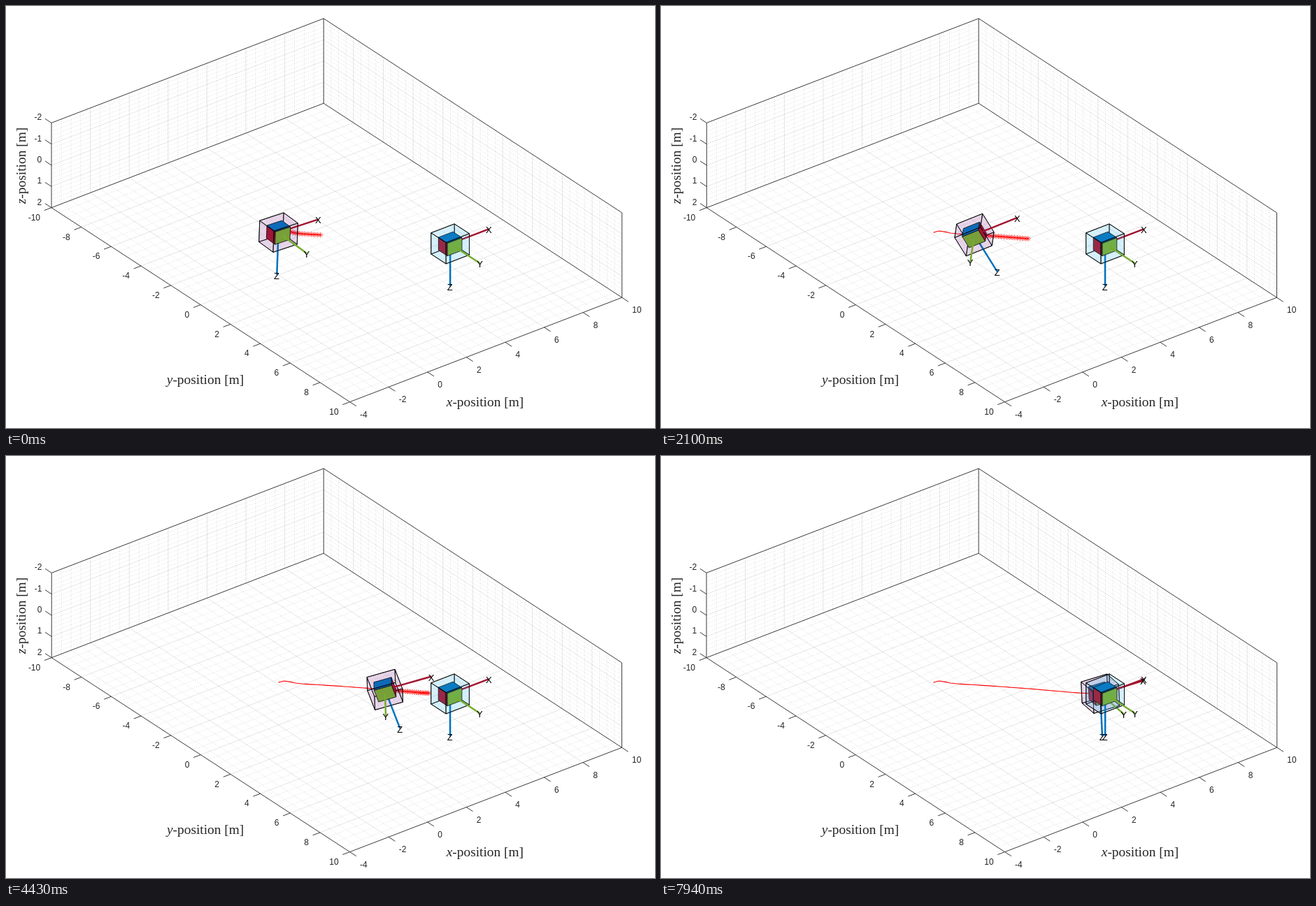
An HTML page for the animation above (8000 ms loop, 928x604 px).

```html
<!DOCTYPE html>
<html lang="en">
<head>
<meta charset="utf-8">
<title>Approach and docking</title>
<style>
html, body { margin: 0; width: 100%; height: 100%; overflow: hidden; background: #fff; }
svg { display: block; width: 928px; height: 604px; }
text { fill: #262626; font: 12px "Liberation Sans", Arial, sans-serif; }
.title { font: 19.4px "Liberation Serif", "Times New Roman", serif; text-anchor: middle; }
.title tspan { font-style: italic; }
.tag { fill: #000; font-size: 13px; text-anchor: middle; }
path, polygon { fill: none; stroke-linejoin: round; }
.major { stroke: #262626; stroke-opacity: .15; stroke-width: .8; }
.minor { stroke: #1a1a1a; stroke-opacity: .25; stroke-width: .6; stroke-dasharray: 1 2; }
.frame { stroke: #262626; stroke-width: .9; }
.edge { stroke: #000; stroke-width: .8; }
.trail { stroke: #f00; stroke-width: 1.1; }
.star { stroke: #f00; stroke-width: .7; }
</style>
</head>
<body>
<svg viewBox="0 0 928 604"><g id="scene"><g id="axes"></g><g id="bodies"></g></g></svg>
<script>
const LOOP = 8000, STEP = 100.6, UNIT = 35.04;
const COLORS = ['#a2142f', '#77ac30', '#0072bd'];
const INNER = [.375, .3, .3], OUTER = [.6, .5, .5];
const HOME = [55.6, 42.66, 0, -21.34, 27.8, 60.7];

// time, screen x, horizontal plot scale, then screen right and down parts of the body axes
const KEYS = [
  [0, 389.5, 1, 57.5, 40.8, -2.2, -18.5, 30.3, 61],
  [1210, 414, .9976, 67.5, 15.8, -.7, -9, 38.6, 57.6],
  [2100, 447.5, .9993, 61.9, -5.6, 32.9, -23.8, 39.2, 54.2],
  [3520, 505, 1, 63.9, -3.1, 28.4, -21.8, 39.7, 54.2],
  [5440, 580, .999, 67.4, 8.4, 12.9, -15.8, 35.7, 58.7],
  [6840, 615.3, 1, 64.1, 26.1, 4.1, -16.8, 29.5, 61.2],
  [7940, 628.2, 1, 61, 33.5, 2.7, -20, 28.3, 60.5],
  [10000, 634.5, 1, ...HOME]
];
const ROUTE = [[389, 324.3], [397, 322], [407, 323.3], [414, 325], [425, 326.2], [447, 327.5],
  [490, 330.3], [505, 331.5], [533, 333.6], [580, 337.7], [600, 339.3], [618, 340], [640, 340.5]];

const $ = id => document.getElementById(id);
const dot = (a, b) => a[0] * b[0] + a[1] * b[1] + a[2] * b[2];
const cross = (a, b) => [0, 1, 2].map(i => a[(i + 1) % 3] * b[(i + 2) % 3] - a[(i + 2) % 3] * b[(i + 1) % 3]);
const unit = a => a.map(v => v / Math.hypot(...a));
const fmt = p => p.map(v => v.toFixed(2)).join(' ');
const path = (points, cls, extra = '') => `<path class="${cls}" d="M${points.map(fmt).join('L')}" ${extra}/>`;
const world = (x, y, z) => [389.5 + 27.8 * x + 21.33 * y, 324.3 - 10.67 * x + 13.9 * y + 30.34 * z];

function segment(list, at) {
  let i = 0;
  while (i < list.length - 2 && at >= list[i + 1][0]) i++;
  return i;
}

function routeY(x) {
  const i = segment(ROUTE, x), [x0, y0] = ROUTE[i], [x1, y1] = ROUTE[i + 1];
  return y0 + (y1 - y0) * (x - x0) / (x1 - x0);
}

function slope(i, c) {
  if (i === 0 || i === KEYS.length - 1) return 0;
  const a = KEYS[i - 1], b = KEYS[i + 1];
  return (b[c] - a[c]) / (b[0] - a[0]);
}

// Cubic Hermite value of one column at time t
function track(t, c) {
  t = Math.min(t, KEYS[KEYS.length - 1][0]);
  const i = segment(KEYS, t), a = KEYS[i], b = KEYS[i + 1], h = b[0] - a[0], u = (t - a[0]) / h, v = 1 - u;
  return a[c] * (1 + 2 * u) * v * v + b[c] * u * u * (3 - 2 * u) + h * u * v * (slope(i, c) * v - slope(i + 1, c) * u);
}

const place = t => { const x = track(t, 1); return [x, routeY(x)]; };

function makePose(center, values) {
  const right = unit(values.slice(0, 3)), raw = values.slice(3), k = dot(raw, right);
  const down = unit(raw.map((v, i) => v - k * right[i]));
  return {
    near: cross(down, right),
    at: p => [center[0] + UNIT * dot(right, p), center[1] + UNIT * dot(down, p)]
  };
}

function boxFaces(pose, half, front, style) {
  let out = '';
  for (let i = 0; i < 3; i++) for (const s of [-1, 1]) {
    if ((s * pose.near[i] > 0) !== front) continue;
    const j = (i + 1) % 3, k = (i + 2) % 3;
    const corners = [[-1, -1], [1, -1], [1, 1], [-1, 1]].map(([a, b]) => {
      const p = [];
      p[i] = s * half[i]; p[j] = a * half[j]; p[k] = b * half[k];
      return fmt(pose.at(p));
    });
    out += `<polygon class="edge" points="${corners.join(' ')}" style="${style(i)}"/>`;
  }
  return out;
}

function bodyAxes(pose, front) {
  return COLORS.map((color, i) => {
    if ((pose.near[i] > 0) !== front) return '';
    const along = d => [0, 1, 2].map(n => n === i ? d : 0);
    return path([pose.at(along(front ? INNER[i] : 0)), pose.at(along(2))], '', `stroke="${color}" stroke-width="2.5"`);
  }).join('');
}

function drawBody(pose, tint, alpha) {
  const glass = () => `fill:${tint};fill-opacity:${alpha}`;
  return boxFaces(pose, OUTER, false, glass) + bodyAxes(pose, false) +
    boxFaces(pose, INNER, true, i => `fill:${COLORS[i]}`) +
    boxFaces(pose, OUTER, true, glass) + bodyAxes(pose, true);
}

function drawTags(pose) {
  return ['X', 'Y', 'Z'].map((name, i) => {
    const [x, y] = pose.at([0, 1, 2].map(n => n === i ? 2 : 0));
    return `<text class="tag" x="${(x - .3).toFixed(2)}" y="${(y + 6).toFixed(2)}">${name}</text>`;
  }).join('');
}

function star([x, y]) {
  const r = 3.8, q = 2.7;
  return `M${fmt([x - r, y])}h${2 * r}M${fmt([x, y - r])}v${2 * r}M${fmt([x - q, y - q])}l${2 * q} ${2 * q}M${fmt([x - q, y + q])}l${2 * q} ${-2 * q}`;
}

function drawAxes() {
  let minor = '', major = '', ticks = '';
  const line = (a, b, isMajor) => {
    const s = path([world(...a), world(...b)], isMajor ? 'major' : 'minor');
    if (isMajor) major += s; else minor += s;
  };
  for (let x = -3.5; x < 10; x += .5) {
    line([x, -10, 2], [x, 10, 2], x % 2 === 0);
    line([x, -10, -2], [x, -10, 2], x % 2 === 0);
  }
  for (let y = -9.5; y < 10; y += .5) {
    line([-4, y, 2], [10, y, 2], y % 2 === 0);
    line([10, y, -2], [10, y, 2], y % 2 === 0);
  }
  for (let n = -9; n < 10; n++) {
    line([-4, -10, n / 5], [10, -10, n / 5], n % 5 === 0);
    line([10, -10, n / 5], [10, 10, n / 5], n % 5 === 0);
  }
  const tick = (p, value, [dx, dy], [tx, ty], anchor) => {
    const [x, y] = world(...p);
    ticks += path([[x, y], [x + dx, y + dy]], 'frame') +
      `<text x="${x + tx}" y="${y + ty}" text-anchor="${anchor}">${value}</text>`;
  };
  for (let x = -4; x <= 10; x += 2) tick([x, 10, 2], x, [9.2, 6], [14.5, 22], 'start');
  for (let y = -10; y <= 10; y += 2) tick([-4, y, 2], y, [-10.3, 3.9], [-16, 18.2], 'end');
  for (let z = -2; z <= 2; z++) tick([-4, -10, z], z, [-9.2, -6], [-13.8, -4], 'end');

  const ring = z => [[-4, -10, z], [10, -10, z], [10, 10, z]];
  const outline = path([...ring(2), [-4, 10, 2], [-4, -10, 2]].map(p => world(...p)), 'frame') +
    path(ring(-2).map(p => world(...p)), 'frame') +
    ring(2).map(([x, y]) => path([world(x, y, -2), world(x, y, 2)], 'frame')).join('');
  const title = (name, transform) => `<text class="title" transform="${transform}"><tspan>${name}</tspan>-position [m]</text>`;
  $('axes').innerHTML = minor + major + outline + ticks +
    title('x', 'translate(685 573)') + title('y', 'translate(285 541)') + title('z', 'translate(28 228.5) rotate(-90)');
}

const target = makePose(world(5, 5, 0), HOME);

function render(ms) {
  const n = Math.floor((ms + 15) / STEP), t = n * STEP;
  const chaser = makePose(place(t), [3, 4, 5, 6, 7, 8].map(c => track(t, c)));
  const trail = Array.from({ length: n + 1 }, (_, i) => place(i * STEP));
  const reach = 1900 + 250 * Math.max(0, 1 - t / 1200);
  const plan = Array.from({ length: 21 }, (_, i) => place(t + reach * i / 20));
  $('scene').setAttribute('transform', `translate(473 0) scale(${track(t, 2)} 1) translate(-473 0)`);
  $('bodies').innerHTML = path(trail, 'trail') + path(plan, 'trail') +
    `<path class="star" d="${plan.map(star).join('')}"/>` +
    drawBody(chaser, '#7e2f8e', .1) + drawBody(target, '#4dbeee', .12) +
    drawTags(chaser) + drawTags(target);
}

let shown = -1;
const start = performance.now();
function tickFrame() {
  const ms = (performance.now() - start) % LOOP, n = Math.floor((ms + 15) / STEP);
  if (n !== shown) { shown = n; render(ms); }
  requestAnimationFrame(tickFrame);
}
drawAxes();
tickFrame();
</script>
</body>
</html>
```
